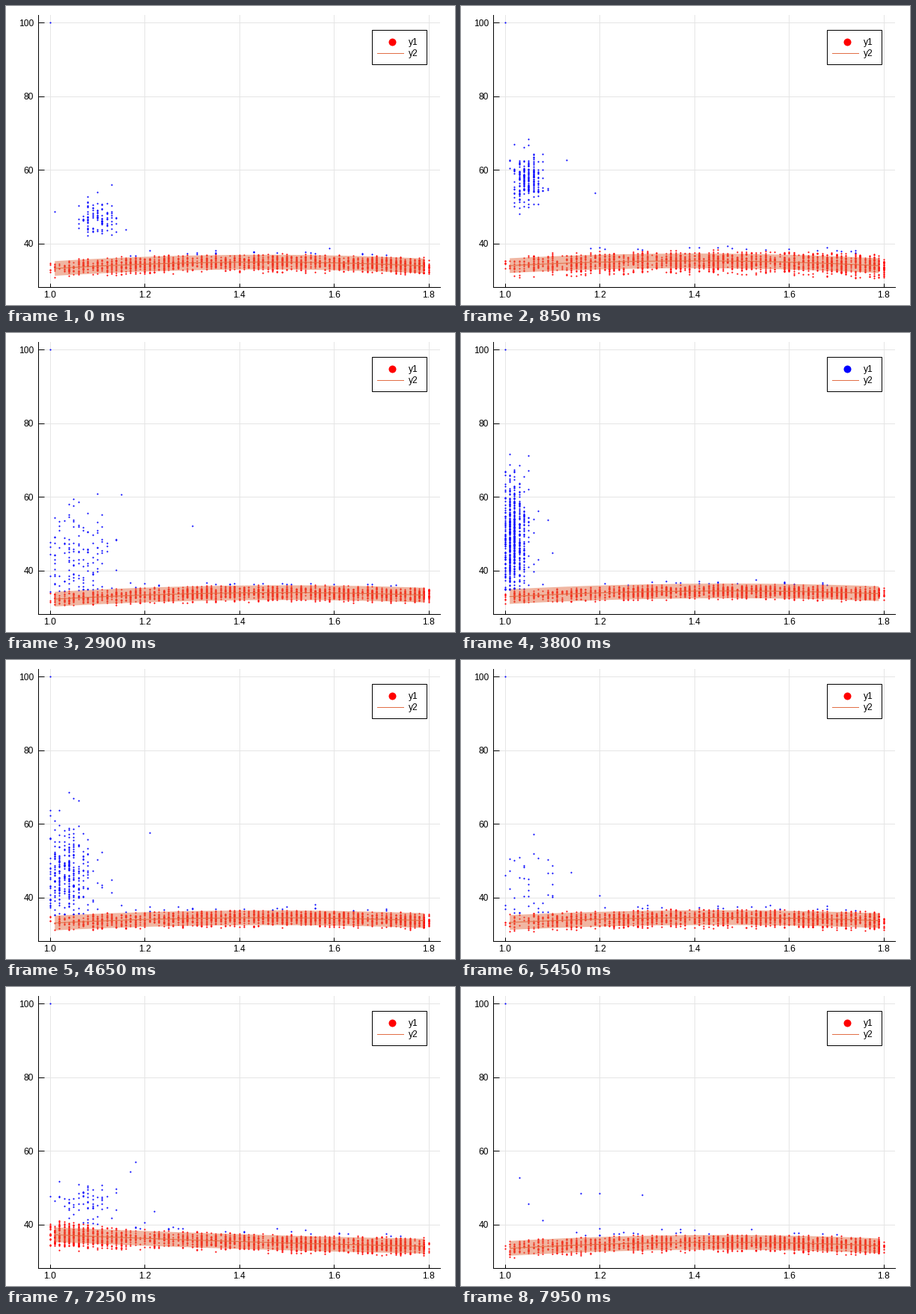
Write a matplotlib script that moves like this. It is 600 px wide and 400 px high and loops after 8 s.

```python
import numpy as np
import matplotlib.pyplot as plt
from matplotlib.animation import FuncAnimation
from matplotlib.patches import Rectangle

FRAMES, STEP = 160, 50
RED, BLUE, CORAL = "#ff0000", "#0000ff", "#e26f46"
PX = 0.72  # points per pixel at 100 dpi
TEXT = 12 * PX
LOW, TOP = 30.3, 100

plt.rcParams["font.family"] = "Liberation Sans"

# key moments and the values passed through at each of them
AT = [0, 33, 58, 76, 109, 131, 159]
TRACKS = dict(
    left=[33.2, 34.7, 32.2, 32.9, 33.2, 40.9, 33.5],   # fit at 1.01
    mid=[34.9, 35.6, 33.9, 34.4, 34.5, 35.6, 35.1],    # fit at 1.40
    right=[33.9, 34.0, 33.3, 33.7, 33.7, 34.0, 34.2],  # fit at 1.79
    spread=[1.1, 1.8, 1.0, .9, 1.15, 1.2, 1.1],
    hot=[95, 310, 130, 560, 35, 125, 1],               # blue cloud size
    hot_x=[.1, 0, .06, .018, .05, .045, .1],
    hot_sx=[.02, .014, .04, .014, .035, .025, .05],
    hot_y=[47.5, 67.5, 44, 49, 44, 47.5, 45],
    hot_sy=[3, 4.3, 6.5, 7.5, 5.5, 2.8, 3],
)
COLUMNS = np.round(np.linspace(1, 1.8, 81), 2)


def curve(p, x):
    """Parabola through the three fit values."""
    t = (x - 1.4) / .39
    return (p["mid"] + t * (p["right"] - p["left"]) / 2
            + t * t * ((p["left"] + p["right"]) / 2 - p["mid"]))


def snap(x):
    """Fold offsets into the range and round to hundredths."""
    return np.round(1 + np.minimum(np.abs(x), .8), 2)


def spread_at(p, x):
    """Noise width, which grows on the left when the fit falls steeply."""
    heat = max(0, p["left"] - p["mid"]) / 5.3
    return p["spread"] + 2 * heat * np.exp(-((x - 1) / .13) ** 2)


def limit_at(p, x):
    return curve(p, x) + np.minimum(2.1 * spread_at(p, x), 4.7)


def band(rng, p):
    """Red points scattered around the fit, in columns of uneven weight."""
    weight = (COLUMNS - .998) ** .35 * rng.uniform(.4, 1.6, COLUMNS.size)
    weight[-1] *= .5
    heat = max(0, p["left"] - p["mid"]) / 5.3
    x = np.concatenate([
        rng.choice(COLUMNS, 2100, p=weight / weight.sum()),
        snap(rng.normal(.055, .045, int(1100 * heat)))])
    y = curve(p, x)
    off = rng.normal(0, 1, x.size) * spread_at(p, x)
    off = np.where(y + off > limit_at(p, x), off * .45, off)
    y = y + np.where(off < -2.6 * spread_at(p, x), off * .5, off)
    return np.column_stack([x, np.maximum(y, LOW)])


def outliers(rng, p):
    """Blue points: a cloud, a few strays and a fringe above the band."""
    n = int(p["hot"])
    strays = 6 + n // 25
    widths = np.r_[np.ones(n), np.full(strays, 3.0)]
    x = snap(rng.normal(p["hot_x"], p["hot_sx"] * widths))
    y = rng.normal(p["hot_y"], p["hot_sy"] * np.sqrt(widths))
    fringe = snap(rng.uniform(.17, .75, 20))
    above = limit_at(p, fringe) + .1 + rng.exponential(.4, fringe.size)
    x, y = np.r_[1, x, fringe], np.r_[TOP, y, above]
    return np.column_stack([x, np.maximum(y, limit_at(p, x) + .1)])


fig = plt.figure(figsize=(6, 4), dpi=100, facecolor="white")
ax = fig.add_axes([43.3 / 600, 24.3 / 400, 536.7 / 600, 363.7 / 400])
pad = .03 * (TOP - LOW)
ax.set(xlim=(.9755, 1.824), ylim=(LOW - pad, TOP + pad),
       xticks=[1, 1.2, 1.4, 1.6, 1.8], yticks=[40, 60, 80, 100])
ax.set_axisbelow(True)
ax.grid(color="#e5e5e5", lw=PX)
ax.tick_params(direction="in", width=PX, labelsize=TEXT)
ax.tick_params(axis="x", length=5 * PX, pad=5.5 * PX)
ax.tick_params(axis="y", length=8 * PX, pad=6 * PX)
ax.spines[["top", "right"]].set_visible(False)
ax.spines[["left", "bottom"]].set_linewidth(PX)

dot = dict(ls="", marker="o", ms=2.1 * PX, mew=0, clip_on=False)
red_dots, = ax.plot([], [], color=RED, zorder=2, **dot)
blue_dots, = ax.plot([], [], color=BLUE, zorder=2.1, **dot)
ribbon, = ax.fill([1, 1, 1], [40, 41, 42], color=CORAL, alpha=.5, lw=0,
                  zorder=3)
line, = ax.plot([], [], color=CORAL, lw=PX, zorder=4)

# legend, laid out in pixels from the top left corner
key = fig.add_axes([0, 0, 1, 1])
key.set(xlim=(0, 600), ylim=(400, 0))
key.axis("off")
key.add_patch(Rectangle((489, 32), 73, 46, fc="white", ec="black", lw=PX))
key_dot, = key.plot(516, 47.5, "o", ms=10 * PX, mew=0)
key.plot([495.5, 531], [63, 63], color=CORAL, lw=PX)
for name, y in (("y1", 52), ("y2", 67)):
    key.text(537.5, y, name, size=TEXT, va="baseline")

xs = np.linspace(1.01, 1.79, 79)


def draw(i):
    rng = np.random.default_rng(100 + i)
    p = {name: np.interp(i, AT, v) for name, v in TRACKS.items()}
    red_dots.set_data(*band(rng, p).T)
    blue_dots.set_data(*outliers(rng, p).T)
    ys = curve(p, xs)
    line.set_data(xs, ys)
    ribbon.set_xy(np.column_stack([np.r_[xs, xs[::-1]],
                                   np.r_[ys + 2, ys[::-1] - 2]]))
    key_dot.set_color(BLUE if p["hot"] > 450 else RED)
    return red_dots, blue_dots, ribbon, line, key_dot


anim = FuncAnimation(fig, draw, frames=FRAMES, interval=STEP, repeat=True,
                     repeat_delay=0, blit=False)
plt.show()
```
